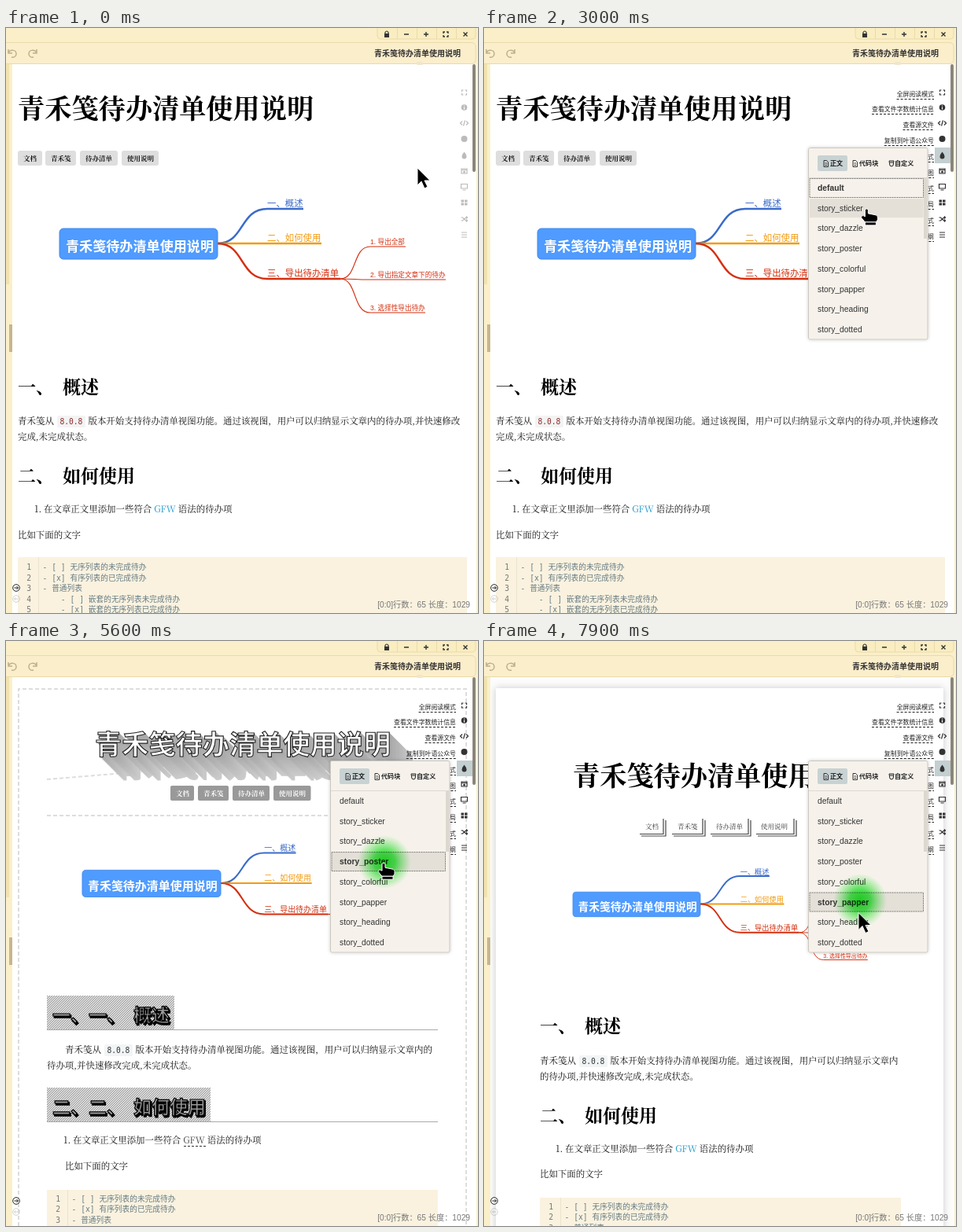
Recreate the animation shown at these times as an HTML page. Size 600 px wide and 744 px high, loop 8000 ms.

```html
<!DOCTYPE html>
<html lang="zh">
<head>
<meta charset="utf-8">
<style>
html,body{margin:0;width:600px;height:744px;overflow:hidden;background:#fff}
svg{display:block}
text{white-space:pre;font-family:"Liberation Sans","Noto Sans CJK SC","Noto Sans CJK",sans-serif}
.r{font-family:"Noto Serif CJK SC","Noto Serif SC","Noto Serif","Noto Sans CJK SC",serif}
.m{font-family:"DejaVu Sans Mono","Noto Sans CJK SC",monospace}
.n{font-family:"Noto Sans Mono CJK SC","Noto Sans CJK SC",monospace}
.b{font-weight:700}
.e{text-anchor:end}
.c{text-anchor:middle}
#ball{mix-blend-mode:multiply}
</style>
</head>
<body>
<svg id="stage" width="600" height="744" viewBox="0 0 600 744"></svg>
<script>
const stage = document.getElementById('stage');
const APP = '青禾笺', TITLE = APP + '待办清单使用说明';
const TAGS = ['文档', APP, '待办清单', '使用说明'];
const LONG = '版本开始支持待办清单视图功能。通过该视图，用户可以归纳显示文章内的待办项,并快速修改完成,未完成状态。';
const CODE = ['- [ ] 无序列表的未完成待办', '- [x] 有序列表的已完成待办', '- 普通列表',
  '    - [ ] 嵌套的无序列表未完成待办', '    - [x] 嵌套的无序列表已完成待办', '', '',
  '1. [ ] 有序列表的未完成待办', '2. [x] 有序列表的完成待办', '3. 普通有序列表'];

const text = (x, y, size, s, fill = '#111', cls = '', more = '') =>
  `<text x="${x}" y="${y}" font-size="${size}" fill="${fill}" class="${cls}" ${more}>${s}</text>`;
const rect = (x, y, w, h, fill, more = '') =>
  `<rect x="${x}" y="${y}" width="${w}" height="${h}" fill="${fill}" ${more}/>`;
const path = (d, stroke, w = 1, fill = 'none', more = '') =>
  `<path d="${d}" stroke="${stroke}" stroke-width="${w}" fill="${fill}" ${more}/>`;
const group = (id, s, more = '') => `<g id="${id}" ${more}>${s}</g>`;

function mindMap(scale, tx, ty) {
  const red = '#d42f0f';
  const branch = (y, end, color, s) =>
    path(`M269 274C303 274 297 ${y} 332 ${y}H${end}`, color, 2.4) + text(332, y - 3, 11.4, s, color);
  const leaf = (y, end, s) =>
    path(`M425 319C447 319 440 ${y} 463 ${y}H${end}`, red, 1.2) + text(463, y - 3, 8.6, s, red);
  return `<g transform="translate(${tx} ${ty}) scale(${scale})">` +
    branch(230, 378, '#3a6bc9', '一、概述') + branch(274, 401, '#f29b10', '二、如何使用') +
    branch(319, 425, red, '三、导出待办清单') +
    leaf(278, 508, '1. 导出全部') + leaf(320, 559, '2. 导出指定文章下的待办') + leaf(362, 533, '3. 选择性导出待办') +
    rect(68, 255, 201, 39, '#4f9bff', 'rx="5" stroke="#4289ea"') +
    text(76, 284, 17.1, TITLE, '#fff', 'b') + '</g>';
}

const heading = (x, y, a, b, color, cls = 'r b') =>
  text(x, y, 23, a, color, cls) + text(x + 57, y, 23, b, color, cls);

const listText = (link, more = '') =>
  `在文章正文里添加一些符合 <tspan fill="${link}" ${more}>GFW</tspan> 语法的待办项`;

function paragraph(x, y, cut, o = {}) {
  const left = o.left ?? x;
  return text(x, y, 11.5, APP + '从', '#111', 'r') +
    rect(x + 50, y - 11, 36, 15, o.back || '#f3f3f3', 'rx="2"') +
    text(x + 53.5, y, 9.6, '8.0.8', o.color || '#333', 'm') +
    text(x + 89.5, y, 11.45, LONG.slice(0, cut), '#111', 'r') +
    text(left, y + 20, 11.45, LONG.slice(cut), '#111', 'r');
}

function codeBlock(x, w, y, first, pitch = 13.6, cls = 'm', size = 9.7, h = 744 - y) {
  return rect(x, y, w, h, '#faf2df') + rect(x + 26, y, .8, h, '#e8dfc6') +
    CODE.map((s, i) => text(x + 17, first + i * pitch, size, i + 1, '#777', cls + ' e') +
      text(x + 31.5, first + i * pitch, size, s, '#657b83', cls)).join('');
}

const badge = (x, y, n, color, rim) =>
  `<circle cx="${x + 1}" cy="${y + .5}" r="8" fill="${rim}"/><circle cx="${x}" cy="${y}" r="7" fill="${color}" stroke="#fff" stroke-width=".8"/>` +
  text(x, y + 4, 11, n, '#fff', 'r c');
const tagRow = (y, xs, ws, fill, color, pad = 7, more = 'rx="3"') => TAGS.map((s, i) =>
  rect(xs[i], y, ws[i], 19, fill, more) + text(xs[i] + pad, y + 12.8, 8.5, s, color, 'r b')).join('');
const card = (x, w, more = '') => rect(x, 60, w, 700, '#fff', 'filter="url(#soft)" ' + more);

function plainScene() {
  return text(15, 115, 34.2, TITLE, '#000', 'r b') +
    tagRow(156, [15, 50, 94, 147], [31, 39, 48, 47], '#dedede', '#111') + mindMap(1, 0, 0) +
    heading(15, 465, '一、', '概述', '#000') + paragraph(15, 504, 42, {color: '#8a2b2b'}) +
    heading(15, 578, '二、', '如何使用', '#000') +
    text(36, 616, 11.45, '1. ' + listText('#1a95c8'), '#111', 'r') +
    text(15, 649, 11.45, '比如下面的文字', '#111', 'r') + codeBlock(15, 571, 673, 689);
}

function stickerScene() {
  const green = '#0f8b4f';
  const banner = (y, a, b) => rect(72, y, 456, 41, 'url(#green)') + heading(87, y + 30, a, b, '#fff', 'b');
  return card(44, 513) +
    path('M8 103H43V388L26 352L8 388Z', 'none', 0, '#c93632') +
    [...TITLE].map((c, i) => text(26, 129 + i * 21.4, 22, c, '#fff', 'b c')).join('') +
    TAGS.map((s, i) => {
      const y = 77 + i * 36.2;
      return path(`M33 ${y + 18}h10v8z`, 'none', 0, '#075f33') + rect(33, y, 56, 19, green, 'rx="2"') +
        text(48, y + 13, 8.5, s, '#fff', 'r b');
    }).join('') +
    mindMap(.751, 74.9, -26.8) + banner(304.5, '一、', '概述') +
    paragraph(87, 373, 29, {color: '#a05a20', back: '#faf6e8'}) + banner(416, '二、', '如何使用') +
    badge(104.5, 481, 1, green, '#075f33') + text(118, 485, 11.5, listText('#c62828'), '#16804c', 'r') +
    text(87, 516, 11.45, '比如下面的文字', '#111', 'r') + codeBlock(87, 427, 541, 557.5, 15, 'n', 10, 160) +
    badge(104.5, 734, 2, green, '#075f33') + text(118, 738.5, 11.5, '点击编辑区右侧的待办视图按钮', '#16804c', 'r') +
    rect(283, 729, 14, 13, '#fff', 'rx="2" stroke="#222"') +
    path('M286.500 731v8h7v-8zM286.500 733.500h7M288 736l1.500 1.500 3-3', '#111', 1.2);
}

function cardScene(back, color, link, tagFill, tagColor, listColor) {
  const xs = [86, 133, 188, 251];
  return back + card(44, 513, 'rx="10"') + text(87, 151, 34.2, TITLE, color, 'r b') +
    tagRow(192, xs, [42.5, 50.5, 58.5, 59], tagFill, tagColor, 18) +
    xs.map(x => path(`M${x + 7.500} 197h4l5 5-4 4-5-5z`, 'none', 0, tagColor)).join('') +
    mindMap(.751, 74.9, 85.7) + heading(87, 449, '一、', '概述', color) +
    paragraph(87, 487, 29, {color: '#6b7a1f', back: '#faf9ee'}) + heading(87, 561, '二、', '如何使用', color) +
    badge(105, 596, 1, link, '#4b168c') + text(118, 600, 11.45, listText(link), listColor, 'r') +
    text(87, 632, 11.45, '比如下面的文字', '#111', 'r') + codeBlock(87, 427, 656, 671.5);
}

function posterScene() {
  let shade = '';
  for (let i = 30; i > 0; i--) {
    const g = 168 + i * 1.2 | 0;
    shade += text(113 + i, 144 + i, 34.2, TITLE, `rgb(${g},${g},${g})`, 'b');
  }
  const dash = d => path(d, '#ddd', 2, 'none', 'stroke-dasharray="5 3"');
  const head = (y, w, a, b) => {
    const words = (dx, fill, stroke, sw) => [[59, a], [105, a], [162, b]].map(p =>
      text(p[0] + dx, y + 33 + dx, 23, p[1], fill, 'b', `stroke="${stroke}" stroke-width="${sw}"`)).join('');
    return rect(52, y, w, 43, 'url(#hatch)') + rect(52, y + 43, 497, 1, '#aaa') +
      words(1.5, '#000', '#000', 1.5) + words(0, '#999', '#000', 1.2);
  };
  return dash('M16 744V61H585V744') + dash('M52 176L210 163') + shade +
    text(113, 144, 34.2, TITLE, '#fff', 'b', 'stroke="#222" stroke-width="1.1"') +
    tagRow(184, [209, 244, 288, 340], [30, 39, 47, 47.5], '#999', '#fff', 7, 'rx="2"') + dash('M52 222H549') +
    mindMap(.876, 37.4, 68) + head(451, 162, '一、', '概述') + paragraph(75, 524, 33, {left: 52, back: '#f1f5f6'}) +
    head(568, 208, '二、', '如何使用') +
    text(73, 639, 11.45, '1. ' + listText('#444'), '#111', 'r') + path('M226 642.500H254', '#333', 1, 'none', 'stroke-dasharray="3 2"') +
    text(75, 672, 11.45, '比如下面的文字', '#111', 'r') + codeBlock(52, 497, 698, 712.5);
}

function paperScene() {
  return rect(8, 46, 590, 698, '#fcfcfc') + card(15, 569) + text(113, 184, 34.2, TITLE, '#000', 'r b') +
    [[198, 231, 205], [239, 281, 246], [288, 339, 295], [346, 397, 352]].map(([l, r, x], i) =>
      path(`M${l} 245.500H${r - 3}V226M${l + 2} 248H${r}V228`, '#444', 1.2) +
      text(x, 238.5, 8.5, TAGS[i], '#333', 'r')).join('') +
    mindMap(.806, 58.2, 113.7) + heading(71, 498, '一、', '概述', '#000') +
    paragraph(71, 538, 32, {back: '#f1f5f6'}) + heading(71, 612, '二、', '如何使用', '#000') +
    text(91, 650, 11.45, '1. ' + listText('#1a95c8'), '#111', 'r') +
    text(71, 682, 11.45, '比如下面的文字', '#111', 'r') + codeBlock(71, 459, 708, 722.5);
}

function frameParts() {
  const ink = '#333', beige = '#faefc8';
  const corners = (x, y) => `M${x - 3} ${y - 1}v-2h2M${x + 1} ${y - 3}h2v2M${x + 3} ${y + 1}v2h-2M${x - 1} ${y + 3}h-2v-2`;
  const turn = 'M-5 -5V0H0M-5 0C-3 -5 5 -5 5 1C5 4 2 6 -1 5';
  return rect(0, 0, 600, 46, beige) + rect(0, 46, 8, 698, beige) + rect(598, 46, 2, 698, beige) +
    rect(-6, 18.5, 603, 27, '#fbeecb', 'rx="5" stroke="#eadba9"') +
    rect(472, -5, 125, 19, '#f9edc1', 'rx="4" stroke="#eadba9"') +
    path('M497.500 0V14M522.500 0V14M547.500 0V14M572.500 0V14', '#eadba9') +
    rect(481, 7, 6, 5, ink) + path('M482 7V5.500Q484 2.500 486 5.500V7', ink, 1.2) +
    path(`M506 8h6M531 8h6M534 5v6M581.500 5.500l5 5M586.500 5.500l-5 5${corners(559, 8)}`, ink, 1.4) +
    path(turn, '#bdb08b', 1.5, 'none', 'transform="translate(8 32)"') +
    path(turn, '#bdb08b', 1.5, 'none', 'transform="translate(34 32) scale(-1 1)"') +
    text(578, 35.5, 10, TITLE, ink, 'b e') + rect(522, 43, 8, 4, '#efe6cc', 'rx="1"') +
    rect(0, 46, 4, 280, '#f1e2b0') + rect(4, 377, 4, 35, '#c9b58d') +
    rect(593, 46, 4, 137, '#8b857a', 'rx="2"') +
    [[712, 1], [726, .2]].map(([y, a]) => `<g opacity="${a}"><circle cx="13" cy="${y}" r="4.300" fill="#fff" stroke="#222"/>` +
      path(a > .5 ? `M10.500 ${y}h5m-2-2l2 2-2 2` : `M15.500 ${y}h-5m2-2l-2 2 2 2`, '#222') + '</g>').join('') +
    text(590, 737, 10.2, '[0:0]行数：65 长度：1029', '#777', 'e');
}

const ROWS = [82, 101, 121, 141, 162, 182, 202, 222, 243, 263];
const LABELS = ['全屏阅读模式', '查看文件字数统计信息', '查看源文件', '复制到叶语公众号', '预览主题样式',
  '导出长图', '切换预览模式', '切换预览布局', '开启对照模式', '文档大纲'];
function sideIcons() {
  const line = d => path(d, 'currentColor', 1.2), solid = d => path(d, 'none', 0, 'currentColor');
  return [line('M-3 -1v-2h2M1 -3h2v2M3 1v2h-2M-1 3h-2v-2'),
    '<circle r="3.800" fill="currentColor"/>' + path('M0 -2.500v1M0 -.5v3', '#fff', 1.2),
    line('M-2.500 -2.500L-5 0l2.500 2.500M2.500 -2.500L5 0l-2.500 2.500M1 -3.500l-2 7'),
    '<circle r="4" fill="currentColor"/>',
    solid('M0 -4.500Q3 -1 3 1.500A3 3 0 0 1 -3 1.500Q-3 -1 0 -4.500Z'),
    line('M-3.500 -3h7v6h-7zM-3.500 -1.500h7') + '<circle cy="1" r="1.500" fill="currentColor"/>',
    line('M-4 -3.500h8v5.500h-8zM-2 4h4'),
    solid('M-4 -3.500h3.500v3h-3.500zM.5 -3.500h3.500v3h-3.500zM-4 .5h3.500v3h-3.500zM.5 .5h3.500v3h-3.500z'),
    line('M-4 -2h2l4 4h2M-4 2h2l4-4h2M2.500 -3.500l1.500 1.500-1.500 1.500M2.500 .5l1.500 1.500-1.500 1.500'),
    line('M-3.500 -3h7M-3.500 0h7M-3.500 3h7')]
    .map((s, i) => `<g transform="translate(582.500 ${ROWS[i]})">${s}</g>`).join('');
}
function sideLabels() {
  return rect(573, 152, 20, 20, '#c3cfd1') + rect(525, 158, 47, 10, '#d8dcdc', 'class="tipped"') +
    LABELS.map((s, i) => {
      const y = ROWS[i] + 5, late = i > 4 && i < 8;
      return `<g class="${late ? 'late' : ''}">` + text(572, y, 7.9, s, '#222', 'e') +
        path(`M${572 - s.length * 7.9} ${y + 3.5}H572`, '#222', 1, 'none', 'stroke-dasharray="3 2"') + '</g>';
    }).join('');
}

const STYLES = ['default', 'sticker', 'dazzle', 'poster', 'colorful', 'papper', 'heading', 'dotted'];
const itemTop = i => 191.5 + i * 25.7;
function panel() {
  const page = x => path(`M${x - 2.500} 168.500h3.500l2 2v6h-5.500zM${x - 1} 172h2.500M${x - 1} 174.500h2.500`, '#222', .9);
  return rect(412.5, 152.5, 151.5, 243.5, '#f6f2eb', 'filter="url(#thin)" stroke="#ccc8bf" rx="2"') +
    rect(424, 162, 38, 20, '#c8d2d3', 'rx="2"') + page(434.5) + page(471.5) +
    path('M515 169h6l-1 6-2 1-2-1zM516 171h4', '#222') +
    text(440, 175, 8.1, '正文', '#222', 'b') + text(477, 175, 8.1, '代码块', '#222', 'b') + text(522, 175, 8.1, '自定义', '#222', 'b') +
    rect(413, 190, 150, .8, '#d8d3ca') + rect(559, 191, 4, 77, '#ddd8cf') +
    rect(414, 0, 144.5, 24, '#e4e0d8', 'id="hover"') +
    rect(414, 0, 144.5, 24, 'none', 'id="pick" stroke="#777" stroke-dasharray="1 .5"') +
    STYLES.map((s, i) => text(424, itemTop(i) + 15.5, 10.3, i ? 'story_' + s : s, '#333', 'item')).join('');
}

const shadow = (id, size, alpha) => `<filter id="${id}" x="-10%" y="-10%" width="120%" height="120%">
<feDropShadow dx="0" dy="0" stdDeviation="${size}" flood-opacity="${alpha}"/></filter>`;
stage.innerHTML = `<defs>${shadow('soft', 5, .2)}${shadow('thin', 2, .2)}
<linearGradient id="green" x2="0" y2="1"><stop stop-color="#0e7d46"/><stop offset=".5" stop-color="#129757"/><stop offset="1" stop-color="#0e8148"/></linearGradient>
<linearGradient id="sky" gradientUnits="userSpaceOnUse" x1="-19" y1="73" x2="625" y2="717"><stop stop-color="#fff"/><stop offset=".3" stop-color="#9be7ff"/><stop offset=".6" stop-color="#1fcfff"/></linearGradient>
<radialGradient id="glow"><stop stop-color="#20e626"/><stop offset=".4" stop-color="#30e838" stop-opacity=".85"/><stop offset="1" stop-color="#60f060" stop-opacity="0"/></radialGradient>
<pattern id="hatch" width="3" height="3" patternUnits="userSpaceOnUse">${rect(0, 0, 3, 3, '#ddd')}${path('M-1 1L1 -1M0 3L3 0M2 4L4 2', '#888', .8)}</pattern>
</defs>` + rect(0, 0, 600, 744, '#fff') +
  [plainScene(), stickerScene(), cardScene('', '#222', '#7a3fc9', '#dedede', '#222', '#222'), posterScene(),
    cardScene(rect(8, 46, 590, 698, 'url(#sky)'), '#0a86ad', '#7a3fd0', '#14697e', '#fff', '#cc2f45'), paperScene()]
    .map((s, i) => group('scene' + i, s)).join('') +
  frameParts() + group('labels', sideLabels()) + group('icons', sideIcons()) +
  group('tip', rect(533, 170, 66, 18, '#222') + text(538.5, 182, 9, LABELS[4], '#fff')) +
  group('panel', panel()) + '<circle id="ball" r="34" fill="url(#glow)"/>' +
  group('arrow', path('M0 0V22L5 17L9 26L13 24L9 16H16Z', '#fff', 1, '#000')) +
  group('hand', path('M-2 1Q0 -1 2 1V6L12 8Q15 9 14 14L12 17H-2L-7 11Q-6 7 -2 10Z', '#fff', 1, '#000') +
    rect(-2, 17, 14, 4, '#000', 'stroke="#fff"'));

const $ = id => document.getElementById(id);
const show = (el, on) => el.style.display = on ? '' : 'none';
const PATH = [[0, 523, 178], [200, 523, 178], [800, 587, 160], [1800, 587, 161], [2300, 539, 183], [3100, 484, 232],
  [3500, 484, 234], [4000, 483, 261], [4800, 482, 262], [5400, 480, 282], [6000, 480, 283], [6600, 476, 309],
  [7200, 476, 311], [7700, 477, 333], [7900, 476, 345.5], [8000, 476, 345.5]];
const CLICKS = [[3300, 484, 234], [4400, 483, 259], [5500, 481, 281], [6700, 475, 310], [7800, 478, 330]];

function cursorAt(t) {
  const i = Math.max(1, PATH.findIndex(p => p[0] > t));
  const [a, b] = [PATH[i - 1], PATH[i]], k = (t - a[0]) / (b[0] - a[0]), e = k * k * (3 - 2 * k);
  return [a[1] + (b[1] - a[1]) * e, a[2] + (b[2] - a[2]) * e];
}

function draw(now) {
  const t = Math.floor(now % 8000 / 100) * 100;
  const [x, y] = cursorAt(t), open = t >= 1700, menu = t >= 700;
  const pick = CLICKS.filter(c => c[0] <= t).length;
  for (let i = 0; i < 6; i++) show($('scene' + i), i === pick);
  show($('labels'), menu);
  $('icons').style.color = menu ? '#333' : '#bbb';
  const tip = t >= 900 && !open;
  show($('tip'), tip);
  show(document.querySelector('.tipped'), tip);
  document.querySelectorAll('.late').forEach(el => el.style.opacity = open ? 1 : .4);
  show($('panel'), open);
  const over = Math.floor((y - 191.5) / 25.7);
  show($('hover'), over >= 0);
  $('hover').setAttribute('y', itemTop(over));
  $('pick').setAttribute('y', itemTop(pick));
  document.querySelectorAll('.item').forEach((el, i) => el.style.fontWeight = i === pick ? 700 : 400);

  const click = CLICKS[pick - 1], age = click ? t - click[0] : 999;
  show($('ball'), age < 500);
  if (click) {
    $('ball').setAttribute('transform', `translate(${click[1]} ${click[2]})`);
    $('ball').setAttribute('opacity', Math.min(1, (500 - age) / 300));
  }
  const hand = menu && t < 7900;
  show($('hand'), hand);
  show($('arrow'), !hand);
  $(hand ? 'hand' : 'arrow').setAttribute('transform', `translate(${x} ${y})`);
}

const start = performance.now();
(function tick() {
  draw(performance.now() - start);
  requestAnimationFrame(tick);
})();
</script>
</body>
</html>
```
